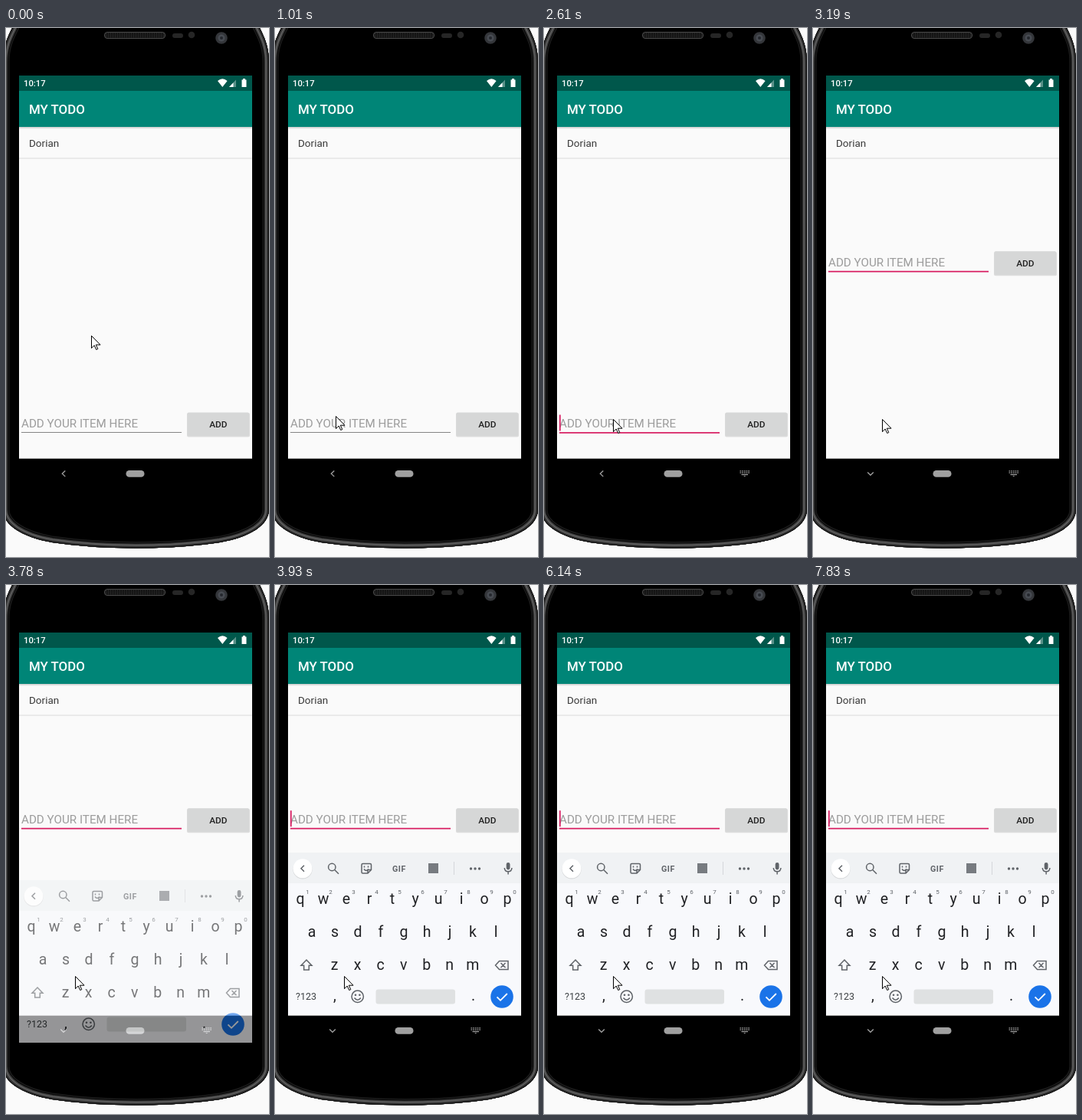
Write an HTML page that moves like this. It is 343 px wide and 690 px high and loops after 8000 ms.

```html
<!DOCTYPE html>
<html lang="en">
<head>
<meta charset="utf-8">
<title>Todo app</title>
<style>
  html, body { margin: 0; width: 100%; height: 100%; overflow: hidden; background: #fafafa; }
  svg { display: block; width: 343px; height: 690px; }
  text { font-family: Roboto, "Noto Sans", sans-serif; }
  .mid { text-anchor: middle; }
  .medium { font-weight: 500; }
  .line { fill: none; stroke: #5f6368; stroke-width: 1.5; }
  .nav { fill: none; stroke: #a0a0a0; stroke-width: 1.3; }
  .key { font-size: 19.5px; fill: #202124; }
  .num { font-size: 8px; fill: #5f6368; }
  .word { font-size: 15px; fill: #5f6368; }
</style>
</head>
<body>
<svg viewBox="0 0 343 690">
  <defs>
    <path id="body" d="M17 -20L8 0C2 12 -4 24 -4 45V628C-4 648 20 664 60 671Q110 678.500 169.500 678.500T279 671C319 664 343 648 343 628V45C343 24 337 12 331 0L322 -20Z"/>
    <clipPath id="inside"><use href="#body"/></clipPath>
    <pattern id="mesh" width="3" height="3" patternUnits="userSpaceOnUse">
      <rect width="3" height="3" fill="#111"/><circle cx="1.500" cy="1.500" r=".9" fill="#2c2c2c"/>
    </pattern>
    <linearGradient id="shade" x2="0" y2="1">
      <stop stop-color="#000" stop-opacity=".2"/><stop offset="1" stop-color="#000" stop-opacity="0"/>
    </linearGradient>
  </defs>

  <!-- Phone -->
  <rect width="343" height="690" fill="#fafafa"/>
  <use href="#body"/>
  <g id="rim" clip-path="url(#inside)" fill="none"></g>
  <rect x="128.500" y="5.500" width="79" height="8" rx="3.500" fill="url(#mesh)" stroke="#4c4c4c"/>
  <rect x="217" y="7" width="14" height="6" rx="3" fill="#262626"/>
  <circle cx="242" cy="9" r="4.300" fill="#262626"/>
  <circle cx="281" cy="13" r="7.800" fill="#34363a"/>
  <circle cx="281" cy="13" r="4.500" fill="#474b52"/>
  <circle cx="281" cy="13" r="2" fill="#24272d"/>

  <!-- App -->
  <rect x="17" y="62" width="304" height="499" fill="#fafafa"/>
  <rect x="17" y="561" width="304" height="1" fill="#a8a8a8"/>
  <rect x="17" y="129" width="304" height="3" fill="url(#shade)"/>
  <rect x="17" y="82" width="304" height="47" fill="#008577"/>
  <rect x="17" y="62" width="304" height="20" fill="#00574b"/>
  <text class="medium" x="23" y="76" font-size="11.300" fill="#fff">10:17</text>
  <g fill="#fff">
    <path d="M276 69Q282.300 63.500 288.600 69L282.300 77Z"/>
    <path d="M291 77L300 67.500V77Z" opacity=".35"/>
    <path d="M291 77L296.500 71.200V77Z"/>
    <path d="M307.500 67.500H309V66H312V67.500H313.500V77H307.500Z"/>
  </g>
  <text class="medium" x="30" y="112" font-size="16.900" fill="#fff">MY TODO</text>
  <text x="30" y="154.500" font-size="13.500" fill="#3a3a3a">Dorian</text>
  <rect x="17" y="169.500" width="304" height="1" fill="#dcdcdc"/>

  <g id="entry">
    <text id="hint" x="20" y="521" font-size="15.200" fill="#9c9c9c">ADD YOUR ITEM HERE</text>
    <text id="typed" x="20" y="521" font-size="15.200" fill="#212121">j</text>
    <rect id="rule" x="20" width="209"/>
    <rect id="caret" y="504.500" width="1.700" height="21" fill="#d81b60"/>
    <rect x="236" y="502" width="82" height="31.500" rx="2" fill="#000" opacity=".12"/>
    <rect x="236.500" y="501.500" width="80.500" height="30.500" rx="1.700" fill="#d6d7d7"/>
    <text class="mid medium" x="276.800" y="521" font-size="11.800" fill="#212121">ADD</text>
  </g>

  <!-- Navigation bar -->
  <path id="back" class="nav" d="M77.300 577.500L73.300 581.300L77.300 585.100"/>
  <path id="down" class="nav" d="M71.200 579.500L75 583.300L78.800 579.500"/>
  <rect x="156.500" y="577" width="24" height="8.800" rx="4.400" fill="#a0a0a0"/>
  <g id="switcher">
    <path class="nav" d="M255.500 577.800H268M255.500 580.200H268" stroke-dasharray="1.700 1"/>
    <path class="nav" d="M257.500 582.500H266"/>
    <path d="M260.200 584H263.200L261.700 585.300Z" fill="#a0a0a0"/>
  </g>

  <!-- Keyboard -->
  <g id="keyboard">
    <rect x="17" y="349" width="304" height="212" fill="#f8f9fc"/>
    <rect x="17" y="349" width="304" height="40" fill="#f0f2f4"/>
    <circle cx="36" cy="370.700" r="12.700" fill="#000" opacity=".1"/>
    <circle cx="36" cy="369.800" r="12.500" fill="#fff"/>
    <path id="fold" class="line" d="M38 365.800L34 369.800L38 373.800"/>
    <g id="tools">
      <circle class="line" cx="74.300" cy="368" r="4.700"/>
      <path class="line" d="M77.700 371.500L83 376.800" stroke-width="2"/>
      <path class="line" d="M114.500 363.500H124Q125.500 363.500 125.500 365V371.500L121 376H114.500Q113 376 113 374.500V365Q113 363.500 114.500 363.500ZM125 371.500H121V376M116 370.500Q119 374.500 122 370.500"/>
      <path class="line" d="M116.500 366.500V368.500M121.500 366.500V368.500"/>
      <text class="mid" x="162" y="373.500" font-size="10.700" font-weight="700" letter-spacing=".6" fill="#5f6368">GIF</text>
      <rect x="200" y="363" width="13" height="13" fill="#777b80"/>
      <rect x="233" y="361" width="1" height="17" fill="#d5d7da"/>
      <g fill="#5f6368"><circle cx="255.500" cy="370" r="1.700"/><circle cx="261" cy="370" r="1.700"/><circle cx="266.500" cy="370" r="1.700"/></g>
    </g>
    <g id="words" class="mid">
      <text class="word" x="87" y="375">j</text>
      <text class="word" x="167.500" y="375">just</text>
      <text class="word" x="248" y="375">I</text>
      <path d="M124.500 360V380M210.500 360V380" stroke="#d5d7da"/>
    </g>
    <rect x="301.700" y="362" width="4.800" height="9.500" rx="2.400" fill="#5f6368"/>
    <path class="line" d="M299.300 369Q299.500 373.800 304.100 373.800T308.900 369M304.100 373.800V377.500" stroke-width="1.300"/>
    <g id="keys" class="mid"></g>
    <path class="line" d="M41 489L48 496.300H44.300V502H37.700V496.300H34Z" stroke-width="1.300"/>
    <path class="line" d="M292.500 490.500H304V501.500H292.500L287.500 496ZM294.500 493L300.500 499M300.500 493L294.500 499" stroke-width="1.400"/>
    <text class="mid" x="40.500" y="541" font-size="12.500" fill="#3c4043">?123</text>
    <text class="mid key" x="78" y="542">,</text>
    <circle class="line" cx="107.700" cy="536.800" r="7.700"/>
    <path class="line" d="M103.500 538.500Q107.700 544 111.900 538.500"/>
    <g fill="#5f6368"><circle cx="105" cy="534.700" r="1.300"/><circle cx="110.400" cy="534.700" r="1.300"/></g>
    <rect x="131.500" y="527.500" width="103.500" height="19" rx="3" fill="#dfe1e2"/>
    <text class="mid key" x="258.500" y="542">.</text>
    <circle cx="296" cy="537" r="14.800" fill="#1a73e8"/>
    <path d="M289.500 537.300L294 541.800L302.800 533" fill="none" stroke="#fff" stroke-width="1.800"/>
  </g>

  <path id="mouse" d="M.5 .5V16.700L4.200 13L6.700 18.500L8.800 17.600L6.300 12.200H12Z" fill="#fff" stroke="#000"/>
</svg>
<script>
const NS = "http://www.w3.org/2000/svg";
const LOOP = 8000;
const parts = {};
document.querySelectorAll("svg [id]").forEach(el => { parts[el.id] = el; });

function add(parent, tag, attrs, text = "") {
  const el = document.createElementNS(NS, tag);
  for (const name in attrs) el.setAttribute(name, attrs[name]);
  el.textContent = text;
  parent.append(el);
}

// Metal edge: nested strokes, widest first
[[17, "#1b1b1b"], [14, "#050505"], [12, "#3b3b3b"], [9, "#606060"], [6, "#353535"], [2.5, "#151515"]]
  .forEach(([width, color]) => add(parts.rim, "use", { href: "#body", stroke: color, "stroke-width": width }));

[["qwertyuiop", 33], ["asdfghjkl", 48], ["zxcvbnm", 77.7]].forEach(([letters, left], row) => {
  [...letters].forEach((letter, i) => {
    const x = left + i * 30;
    add(parts.keys, "text", { class: "key", x, y: 415.5 + row * 43 }, letter);
    if (row === 0) add(parts.keys, "text", { class: "num", x: x + 9.5, y: 403 }, (i + 1) % 10);
  });
});

// Each step holds the properties that change at that time
const steps = [
  [0, { mouse: [111, 401], focus: false, caret: false, raised: false, switcher: false, slide: null, strip: "tools", typed: false }],
  [460, { mouse: [93, 471] }],
  [600, { mouse: [86, 490] }],
  [730, { mouse: [82, 501] }],
  [860, { mouse: [80, 506] }],
  [1010, { mouse: [79, 506] }],
  [1290, { focus: true }],
  [1600, { caret: true }],
  [1750, { caret: false, mouse: [80, 506] }],
  [1890, { mouse: [90, 510] }],
  [2170, { switcher: true }],
  [2610, { caret: true }],
  [3190, { caret: false, raised: true }],
  [3780, { slide: 36 }],
  [3930, { slide: 0, caret: true }],
  [4050, { typed: true, strip: "words" }],
  [4200, { caret: false }],
  [4760, { caret: true }],
  [5160, { caret: false }],
  [5590, { caret: true }],
  [5840, { typed: false }],
  [5990, { strip: "empty" }],
  [6140, { strip: "tools" }],
  [6440, { caret: false }],
  [6840, { caret: true }],
  [7400, { caret: false }],
  [7830, { caret: true }]
];

const stateAt = time => Object.assign({}, ...steps.filter(s => s[0] <= time).map(s => s[1]));
const show = (name, on) => { parts[name].style.display = on ? "" : "none"; };
const set = (name, attrs) => { for (const key in attrs) parts[name].setAttribute(key, attrs[key]); };

function draw(time) {
  const s = stateAt(time);
  set("mouse", { transform: `translate(${s.mouse})` });
  set("entry", { transform: `translate(0 ${s.raised ? -210.3 : 0})` });
  set("rule", s.focus ? { y: 527.1, height: 1.7, fill: "#d81b60" } : { y: 527, height: 1, fill: "#858585" });
  set("caret", { x: s.typed ? 23.7 : 20 });
  set("keyboard", { transform: `translate(0 ${s.slide || 0})`, opacity: s.slide ? 0.6 : 1 });
  set("fold", { transform: s.strip === "tools" ? "" : "rotate(180 36 369.8)" });
  show("caret", s.caret);
  show("typed", s.typed);
  show("hint", !s.typed);
  show("back", !s.raised);
  show("down", s.raised);
  show("switcher", s.switcher);
  show("keyboard", s.slide !== null);
  show("tools", s.strip === "tools");
  show("words", s.strip === "words");
}

const start = performance.now();
function tick() {
  draw((performance.now() - start) % LOOP);
  requestAnimationFrame(tick);
}
tick();
</script>
</body>
</html>
```
